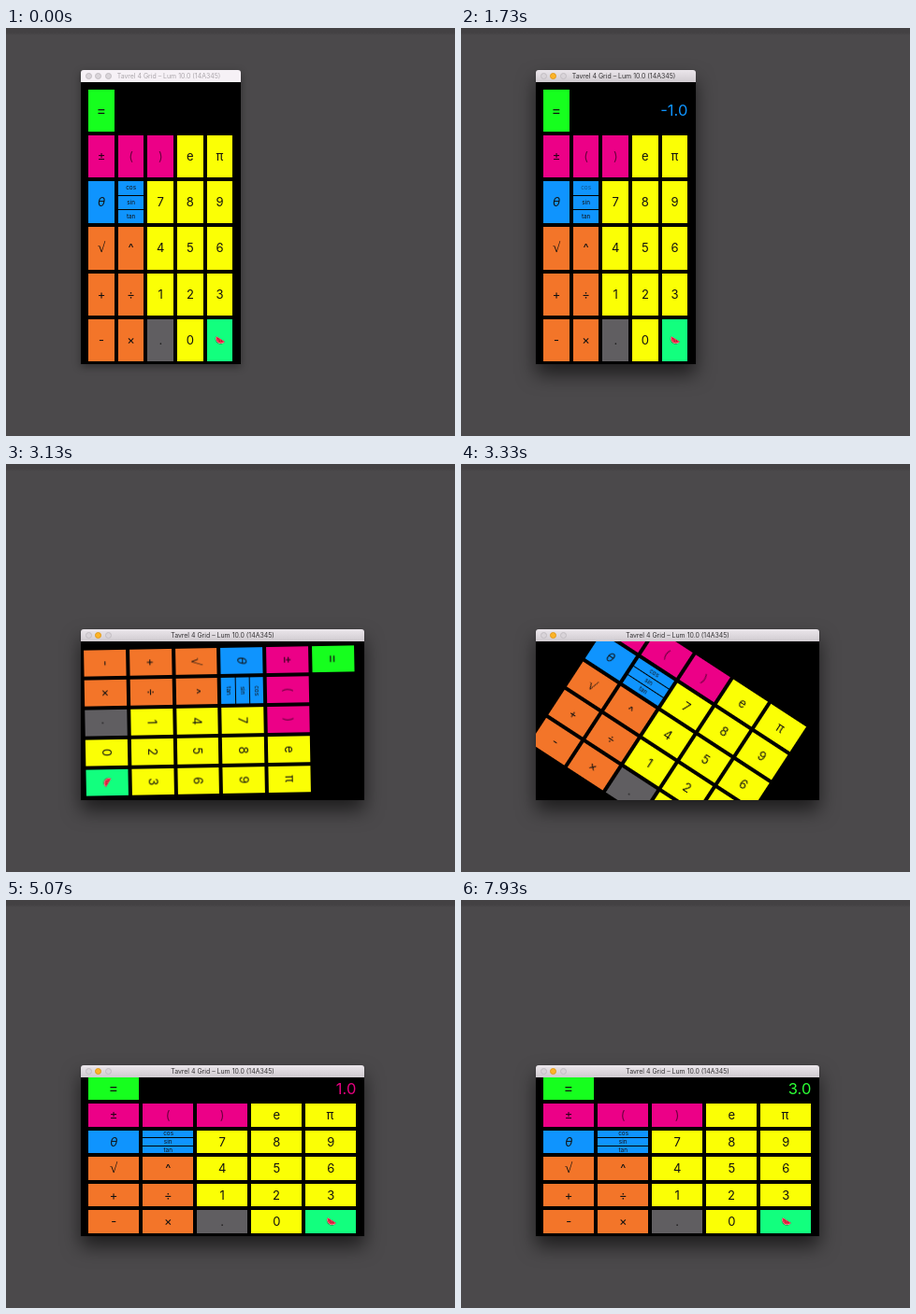
An HTML page for the animation above (8000 ms loop, 480 by 437 pixels).

```html
<!DOCTYPE html>
<html lang="en">
<head>
<meta charset="utf-8">
<title>Calculator</title>
<style>
* { box-sizing: border-box; }
html, body { margin: 0; width: 100%; height: 100%; overflow: hidden; }
body {
  position: relative;
  background: linear-gradient(#434143 0, #434143 5px, #4b494b 8px);
  font: 400 13px/1 Inter, "Open Sans", "DejaVu Sans", sans-serif;
}

/* Every part shares one 8 s clock */
.window, .bar, .bar b, .light, .pad, .value, .press {
  animation: 8s step-end infinite;
}

/* Window */
.window {
  position: absolute; left: 80px; top: 45px; width: 171px; height: 315px;
  border-radius: 3px 3px 0 0;
  animation-name: window;
}
@keyframes window {
  0% { box-shadow: 0 3px 9px rgba(0,0,0,.38); }
  3.4% { box-shadow: 0 11px 20px rgba(0,0,0,.6), 0 0 1px rgba(0,0,0,.5); }
  38.75%, 100% {
    top: 177px; width: 303px; height: 183px;
    box-shadow: 0 11px 20px rgba(0,0,0,.6), 0 0 1px rgba(0,0,0,.5);
  }
}
.bar {
  position: absolute; inset: 0 0 auto; height: 13px; padding-left: 17px;
  border-radius: 3px 3px 0 0; text-align: center; white-space: nowrap;
  font-size: 6.95px; line-height: 13px;
  animation-name: bar;
}
@keyframes bar {
  0% { background: #f6f1f6; }
  3.4% { background: linear-gradient(#ebe6eb, #d0cbd0); }
  38.75%, 100% { background: linear-gradient(#ebe6eb, #d0cbd0); padding-left: 0; }
}
.bar b { font-weight: 400; animation-name: title; }
@keyframes title { 0% { color: #aaa5aa; } 3.4%, 100% { color: #343234; } }
.light {
  position: absolute; top: 3px; width: 7px; height: 7px; border-radius: 50%;
  background: #d9d4d9; border: .5px solid #c2bdc2;
}
.light.mid { animation-name: light; }
@keyframes light { 3.4%, 100% { background: #fdb427; border-color: #e09a1c; } }

/* Keypad */
.screen {
  position: absolute; inset: 13px 0 0; overflow: hidden; background: #000;
  display: flex; align-items: center; justify-content: center;
}
.pad {
  flex: none; display: grid; gap: 4px;
  grid-template: repeat(6, minmax(0, 1fr)) / repeat(5, minmax(0, 1fr));
  width: 171px; height: 302px; padding: 8px 8.7px 3.2px 8.2px;
  animation-name: pad; animation-timing-function: linear;
}
@keyframes pad {
  0%, 38.749% { width: 171px; height: 302px; padding-top: 8px; transform: none; }
  38.75% {
    width: 171px; height: 302px; padding-top: 8px; transform: rotate(90deg);
    animation-timing-function: ease-in-out;
  }
  43.75%, 100% { width: 303px; height: 170px; padding-top: 0; transform: rotate(0deg); }
}
.key { display: flex; align-items: center; justify-content: center; min-width: 0; min-height: 0; color: #111; }
.key span { display: block; }
.go { background: #16ff1e; font-size: 15.5px; }
.pink { background: #ec0087; color: #2a0018; }
.paren { color: #6a003d; }
.num { background: #fbff05; }
.blue { background: #0f94fe; }
.op { background: #f37529; }
.dot { background: #605e61; color: #1c1b1c; }
.mint { background: #12ff7e; }
.trig { display: grid; grid-template-rows: repeat(3, minmax(0, 1fr)); gap: 1.2px; font-size: 6.4px; }
.theta { font-style: italic; }
.root { font: 15px/1 "Liberation Serif", serif; }

/* A tapped glyph dims, then recovers */
.press { animation-name: press; animation-timing-function: linear; animation-delay: calc(var(--at) - 8s); }
@keyframes press { 0% { opacity: 1; } .8% { opacity: .35; } 1.6% { opacity: .4; } 4%, 100% { opacity: 1; } }

/* Display: each value takes the colour of the key last pressed */
.display { grid-column: 2 / -1; position: relative; }
.value {
  position: absolute; right: 0; top: 50%; margin-top: -8.5px;
  font-size: 16.5px; line-height: 17px; white-space: nowrap; opacity: 0;
}
.v-pi { color: #fbff05; font-size: 13.8px; animation-name: v-pi; }
.v-cos { color: #0f94fe; animation-name: v-cos; }
.v-neg { color: #e6007f; animation-name: v-neg; }
.v-add { color: #f37529; animation-name: v-add; }
.v-two { color: #fbff05; animation-name: v-two; }
.v-sum { color: #2cff35; animation-name: v-sum; }
@keyframes v-pi { 0% { opacity: 0; } 11.2% { opacity: 1; } 21.3%, 100% { opacity: 0; } }
@keyframes v-cos { 0% { opacity: 0; } 21.3% { opacity: 1; } 27%, 100% { opacity: 0; } }
@keyframes v-neg {
  0% { opacity: 0; } 27% { opacity: 1; } 38.75% { opacity: 0; }
  43.75% { opacity: 1; } 65.3%, 100% { opacity: 0; }
}
@keyframes v-add { 0% { opacity: 0; } 65.3% { opacity: 1; } 81.5%, 100% { opacity: 0; } }
@keyframes v-two { 0% { opacity: 0; } 81.5% { opacity: 1; } 93.8%, 100% { opacity: 0; } }
@keyframes v-sum { 0% { opacity: 0; } 93.8%, 100% { opacity: 1; } }
</style>
</head>
<body>
<div class="window">
  <div class="bar">
    <i class="light" style="left:4.5px"></i>
    <i class="light mid" style="left:15px"></i>
    <i class="light" style="left:26px"></i>
    <b>Tavrel 4 Grid – Lum 10.0 (14A345)</b>
  </div>
  <div class="screen">
    <div class="pad">
      <div class="key go"><span class="press" style="--at:7.48s">=</span></div>
      <div class="display">
        <span class="value v-pi">3.14159265358979</span>
        <span class="value v-cos">-1.0</span>
        <span class="value v-neg">1.0</span>
        <span class="value v-add">1.0</span>
        <span class="value v-two">2</span>
        <span class="value v-sum">3.0</span>
      </div>

      <div class="key pink"><span class="press" style="--at:2.14s">±</span></div>
      <div class="key pink paren"><span>(</span></div>
      <div class="key pink paren"><span>)</span></div>
      <div class="key num"><span>e</span></div>
      <div class="key num"><span class="press" style="--at:.88s">π</span></div>

      <div class="key blue theta"><span>θ</span></div>
      <div class="trig">
        <div class="key blue"><span class="press" style="--at:1.68s">cos</span></div>
        <div class="key blue"><span>sin</span></div>
        <div class="key blue"><span>tan</span></div>
      </div>
      <div class="key num"><span>7</span></div>
      <div class="key num"><span>8</span></div>
      <div class="key num"><span>9</span></div>

      <div class="key op root"><span>√</span></div>
      <div class="key op"><span>^</span></div>
      <div class="key num"><span>4</span></div>
      <div class="key num"><span>5</span></div>
      <div class="key num"><span>6</span></div>

      <div class="key op"><span class="press" style="--at:5.2s">+</span></div>
      <div class="key op"><span>÷</span></div>
      <div class="key num"><span>1</span></div>
      <div class="key num"><span class="press" style="--at:6.5s">2</span></div>
      <div class="key num"><span>3</span></div>

      <div class="key op"><span>-</span></div>
      <div class="key op"><span>×</span></div>
      <div class="key dot"><span>.</span></div>
      <div class="key num"><span>0</span></div>
      <div class="key mint">
        <svg width="13" height="13" viewBox="-6 -6 12 12">
          <g transform="rotate(32) translate(0 -1.5)">
            <path d="M-5.2 0A5.2 5 0 0 0 5.2 0Z" fill="#1f7a35"/>
            <path d="M-4.8 0A4.8 4.5 0 0 0 4.8 0Z" fill="#f3d9c8"/>
            <path d="M-4.5 0A4.5 4.1 0 0 0 4.5 0Z" fill="#ee2b4b"/>
            <path d="M-2 1h.1M0 2h.1M2 1h.1" stroke="#4a1018" stroke-width=".8" stroke-linecap="round"/>
          </g>
        </svg>
      </div>
    </div>
  </div>
</div>
</body>
</html>
```
